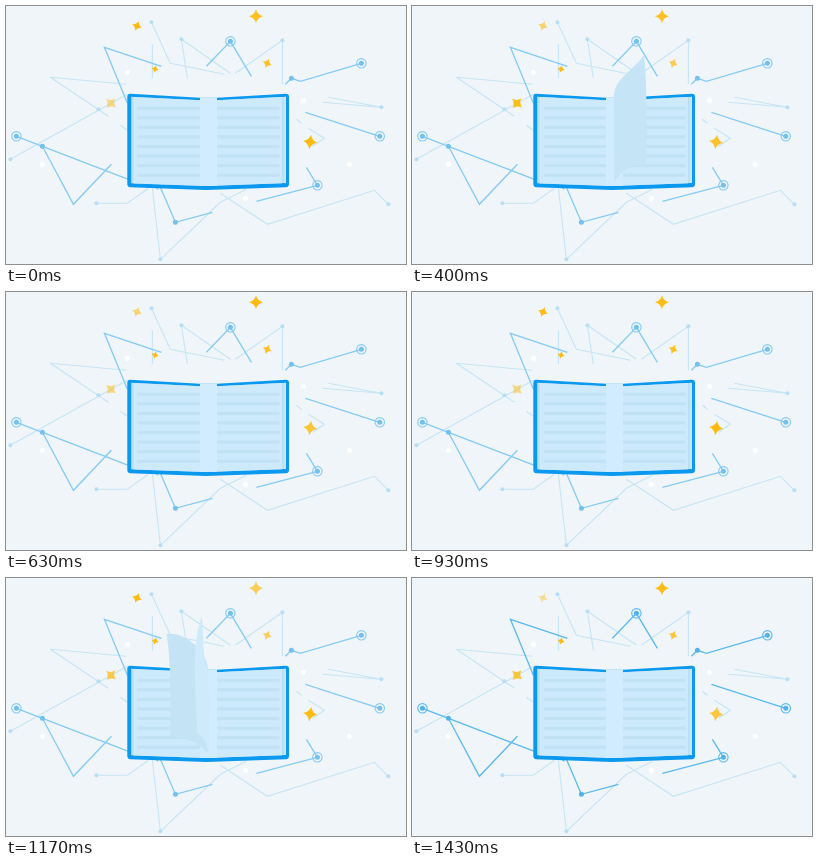
An HTML page that plays this animation: 400x258 px, repeating every 1.93 s.

```html
<!DOCTYPE html>
<html lang="en">
<head>
<meta charset="utf-8">
<title>Open book</title>
<style>
html, body { margin: 0; height: 100%; overflow: hidden; background: #eff5f8; }
svg { display: block; width: 100vw; height: 100vh; }
</style>
</head>
<body>
<svg viewBox="0 0 400 258">
  <rect width="400" height="258" fill="#eff5f8"/>
  <g transform="translate(.4 .3)">
    <g fill="none" stroke="#c6e5f5" stroke-width="1.1">
      <path d="M120 78L44 71L102 110M4 153L121 88M114 119L121 124"/>
      <path d="M145 16L164 57L218 68M146 38V72M181 72L175 33L224 67M229 67L276 34V78"/>
      <path d="M322 91L375 101L316 96M302 122L318 132L306 140M290 113L295 117"/>
      <path d="M90 197H121L142 182M146 182L154 253L214 196L240 183M214 187L261 218L368 184L382 198"/>
    </g>
    <g id="smallDots" fill="#b8def3"></g>
    <g id="net" fill="none" stroke-width="1.3">
      <path d="M155 60L98 41L121 97M200 60L224 35L245 70M279 78L285 72L294 75L355 57"/>
      <path d="M299 106L373.4 130M300 161L311 179L250 195M10 130L122 173M36 140L67 198L105 158"/>
      <path d="M149 181L152 183M154 181L169 216L206 206"/>
    </g>
    <g id="whiteDots" fill="#fff"></g>
  </g>
  <g id="stars" fill="#fdbb10"></g>
  <path fill="#0a99ee" d="M124 87.8L194 91.8H211L280 87.8Q283 87.8 283 90.8V178Q283 181 280 181.3L200 184L124.3 181.3Q121.3 181 121.3 178V90.8Q121.3 87.8 124 87.8Z"/>
  <path fill="#b9dff5" d="M125.2 90.8L194 94.2H211L280 90.8V177L200 180.1L125.2 177.3Z"/>
  <path fill="#cdeafc" d="M127.5 91L194 94.2H211L276 91V177.2L200 180.1L127.5 177.4Z"/>
  <path fill="#c9e7f9" d="M278 91L280 90.9V177L278 177.1Z"/>
  <path fill="#d0ecfe" d="M194 91.5H211V179.7L200 180.1L194 179.9Z"/>
  <g id="lines" fill="#c1e1f5"></g>
  <path id="leafB"/>
  <path id="leafA"/>
</svg>
<script>
const LOOP = 1930;
const STEPS = [0, 100, 200, 300, 400, 500, 580, 630, 930, 1030, 1100, 1170, 1240, 1310, 1370, 1430];
const LEAF_POSES = 6;
const SPINE = 202;
const $ = id => document.getElementById(id);

function add(parent, tag, attrs) {
  const el = document.createElementNS('http://www.w3.org/2000/svg', tag);
  for (const k in attrs) el.setAttribute(k, attrs[k]);
  return parent.appendChild(el);
}
const dots = (id, points, r, more) =>
  points.map(([cx, cy]) => add($(id), 'circle', { cx, cy, r, ...more }));
const mix = (a, b, k) => `rgb(${a.map((v, i) => Math.round(v + (b[i] - v) * k))})`;

const hubs = [[224, 35], [355, 57], [373.4, 130], [311, 179], [10, 130]];
const joints = [[285, 72], [36, 140], [169, 216]];
const cores = dots('net', [...hubs, ...joints], 2.5, { stroke: 'none' });
dots('net', hubs, 4.7, { 'stroke-width': 1.1 });
dots('smallDots', [[4, 153], [92, 103], [145, 16], [175, 33], [276, 34], [375, 101], [90, 197], [154, 253], [382, 198]], 2);
dots('whiteDots', [[121, 66], [297, 94], [36, 158], [343, 158], [239, 192]], 2.6);

for (let i = 0; i < 8; i++)
  for (const x of [131.5, 211])
    add($('lines'), 'rect', { x, y: 100.8 + i * 9.55, width: 62.5, height: 3 });

// base brightness, swing at the pulse, time of the pulse
const STARS = [
  { x: 131, y: 20, r: 5.3, turn: 20, base: 1, swing: -.65, at: 515 },
  { x: 250, y: 10.3, r: 7, turn: 0, base: 1, swing: -.3, at: 205 },
  { x: 149, y: 63, r: 3.7, turn: 15, base: 1, swing: 0, at: 0 },
  { x: 261.3, y: 57.3, r: 5, turn: 22, base: .92, swing: -.3, at: 290 },
  { x: 105, y: 97.2, r: 6.6, turn: 42, base: .5, swing: .5, at: 350 },
  { x: 304.2, y: 136, r: 7.2, turn: 8, base: 1, swing: -.22, at: 540 }
];
for (const s of STARS) {
  s.el = add($('stars'), 'path', {
    d: 'M0-1Q.2-.2 1 0Q.2 .2 0 1Q-.2 .2-1 0Q-.2-.2 0-1Z',
    transform: `translate(${s.x} ${s.y}) rotate(${s.turn}) scale(${s.r})`
  });
}

// Each star pulses twice per loop
function glow({ base, swing, at }, t) {
  const wave = (1 + Math.cos((t - at) / LOOP * 4 * Math.PI)) / 2;
  return base + swing * wave ** 3;
}

// The free edge swings over the spine; an upright leaf bows and catches light
function drawLeaf(el, pose) {
  const shown = pose >= 0 && pose < LEAF_POSES;
  el.setAttribute('visibility', shown ? 'visible' : 'hidden');
  if (!shown) return;
  const a = (27 + 29 * pose) * Math.PI / 180;
  const lift = Math.sin(a);
  const upright = lift ** 24;
  const x = SPINE - 74 * Math.cos(a);
  const y = 85 - 42 * lift ** 2 - 6 * upright;
  const footX = x + 4 - 9 * upright;
  const footY = 170 - 14 * lift;
  const edgeX = x + 4 - 13 * upright;
  const bendX = x + .4 * (SPINE - x);
  const bendY = y + 7 - 11 * Math.sin(2 * a) + 10 * upright;
  el.setAttribute('d',
    `M${SPINE} 92C${SPINE - 7 * upright} ${72 + 8 * upright} ${bendX} ${bendY} ${x} ${y}` +
    `C${edgeX} ${y + 25} ${edgeX} ${y + 48} ${footX} ${footY}` +
    `Q${footX + .65 * (SPINE - footX)} ${footY + 1} ${SPINE + .5} 175.5Z`);
  el.setAttribute('fill', mix([196, 227, 245], [207, 235, 252], upright));
}

function draw(t) {
  const step = STEPS.findLastIndex(s => s <= t);
  const held = STEPS[step];

  // One leaf turns first, then two follow each other
  drawLeaf($('leafA'), step < 8 ? step - 1 : step - 9);
  drawLeaf($('leafB'), held < STEPS.at(-1) ? step - 10 : -1);

  for (const s of STARS) s.el.setAttribute('opacity', glow(s, held));

  const k = Math.max(0, (held - 1170) / 260);
  $('net').setAttribute('stroke', mix([133, 203, 243], [91, 185, 239], k));
  const core = mix([116, 193, 238], [82, 179, 236], k);
  cores.forEach(c => c.setAttribute('fill', core));
}

function frame() {
  draw(performance.now() % LOOP);
  requestAnimationFrame(frame);
}
frame();
</script>
</body>
</html>
```
